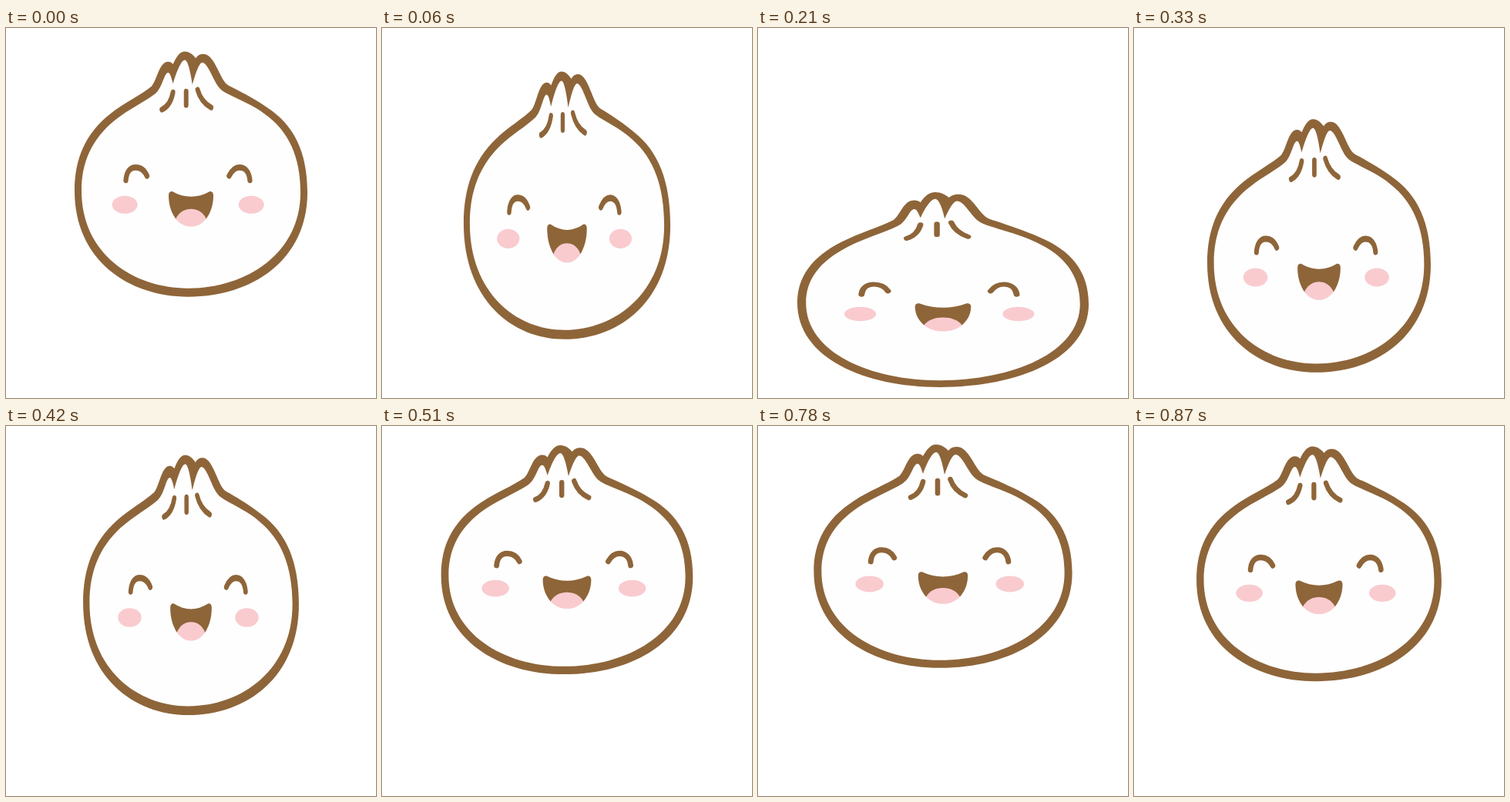
Write an HTML page that moves like this. It is 480 px wide and 480 px high and loops after 900 ms.

```html
<!DOCTYPE html>
<html lang="en">
<head>
<meta charset="utf-8">
<title>Bouncing bun</title>
<style>
  html, body { margin: 0; width: 100%; height: 100%; overflow: hidden; background: #fff; }
  svg { display: block; width: 100vw; height: 100vh; }
  .brown { fill: #8e6539; }
  .pink { fill: #f9cbcf; }
  .line { fill: none; stroke: #8e6539; stroke-width: 7; stroke-linecap: round; }
</style>
</head>
<body>
<svg viewBox="0 0 480 480">
  <g id="bun">
    <path class="brown" d="M72 188C72 150 88 120 124 97C144 84 168 75 183 65C191 58 194 36 207 36C210 36 212 37 214 39
      C219 30 224 24 231 24C238 24 243 28 247 32C250 28 254 27 258 27C271 27 278 46 287 58C291 63 294 64 299 66
      C318 74 334 81 350 90C388 110 408 142 408 190C408 270 328 313 236 313C150 313 72 270 72 188Z"/>
    <path fill="#fefefe" d="M82 188C82 154 97 127 130 105C152 91 172 84 188 74C199 67 201 49 207 49C210 49 212 56 214 62
      C219 48 226 34 231 34C236 34 240 52 242 63C246 52 251 38 256 37C264 37 271 56 280 66C284 70 287 71 291 73
      C310 81 332 88 347 98C381 118 398 148 398 190C398 262 320 303 236 303C156 303 82 262 82 188Z"/>
    <path class="line" style="stroke-width:6.6" d="M214 72C212 81 207 89 198 92.500M233 71V87M249.500 69C253 79 260 86 269 90"/>
    <path class="line" d="M146 175.500C147 165 153 160.500 160 160.500C168 160.500 173 164 176.500 170.500
      M295 170.500C299 164 304 160.500 310 160.500C319 160.500 324 167 325 175.500"/>
    <ellipse class="pink" cx="144.500" cy="204.500" rx="18.300" ry="10.500"/>
    <ellipse class="pink" cx="327" cy="204.500" rx="18.300" ry="10.500"/>
    <path class="brown" d="M214 189.300C222 193 231 195 240 195C249 195 258 193 266 189.300C270 188 272.300 190 272.300 194
      C272 206 268 214 262 221Q240 229 218 221C212 214 208 206 207.700 194C207.700 190 210 188 214 189.300Z"/>
    <path class="pink" d="M218 221C223 213 231 209.500 240 209.500C249 209.500 257 213 262 221C256 227 249 230.300 240 230.300
      C231 230.300 224 227 218 221Z"/>
  </g>
</svg>
<script>
  const LOOP = 900, STEP = 30, APEX = 675, ANCHOR = 211.85;
  const bun = document.getElementById('bun');

  // [ms from the top of the jump, horizontal scale, anchor height]
  const half = [
    [15, 1.001, 211.3], [75, 1, 211.85], [135, 0.99, 214], [195, 0.946, 224.6],
    [225, 0.899, 237.35], [255, 0.833, 257.05], [300, 0.795, 295],
    [345, 0.863, 331.85], [390, 1.016, 362], [435, 1.125, 377.45]
  ];
  const mirror = ([t, s, y], centre) => [2 * centre - t, s, y];
  const keys = [mirror(half[0], 0), ...half, mirror(half[half.length - 1], 450), mirror(half[half.length - 2], 450)];

  function slope(i, c) {
    const a = keys[Math.max(i - 1, 0)], b = keys[Math.min(i + 1, keys.length - 1)];
    return (b[c] - a[c]) / (b[0] - a[0]);
  }

  // Hermite curve through the keys
  function sample(t, c) {
    let i = 0;
    while (keys[i + 1][0] < t) i++;
    const a = keys[i], b = keys[i + 1], d = b[0] - a[0], u = (t - a[0]) / d;
    const ease = u * u * (3 - 2 * u);
    return a[c] + (b[c] - a[c]) * ease
      + d * u * (1 - u) * (slope(i, c) * (1 - u) - slope(i + 1, c) * u);
  }

  function draw() {
    const t = Math.floor(performance.now() % LOOP / STEP) * STEP;
    const phase = (t - APEX + LOOP) % LOOP;
    const tau = Math.min(phase, LOOP - phase);
    const sx = sample(tau, 1), y = sample(tau, 2);
    bun.setAttribute('transform', `translate(240 ${y}) scale(${sx} ${2 - sx}) translate(-240 ${-ANCHOR})`);
    requestAnimationFrame(draw);
  }
  draw();
</script>
</body>
</html>
```
